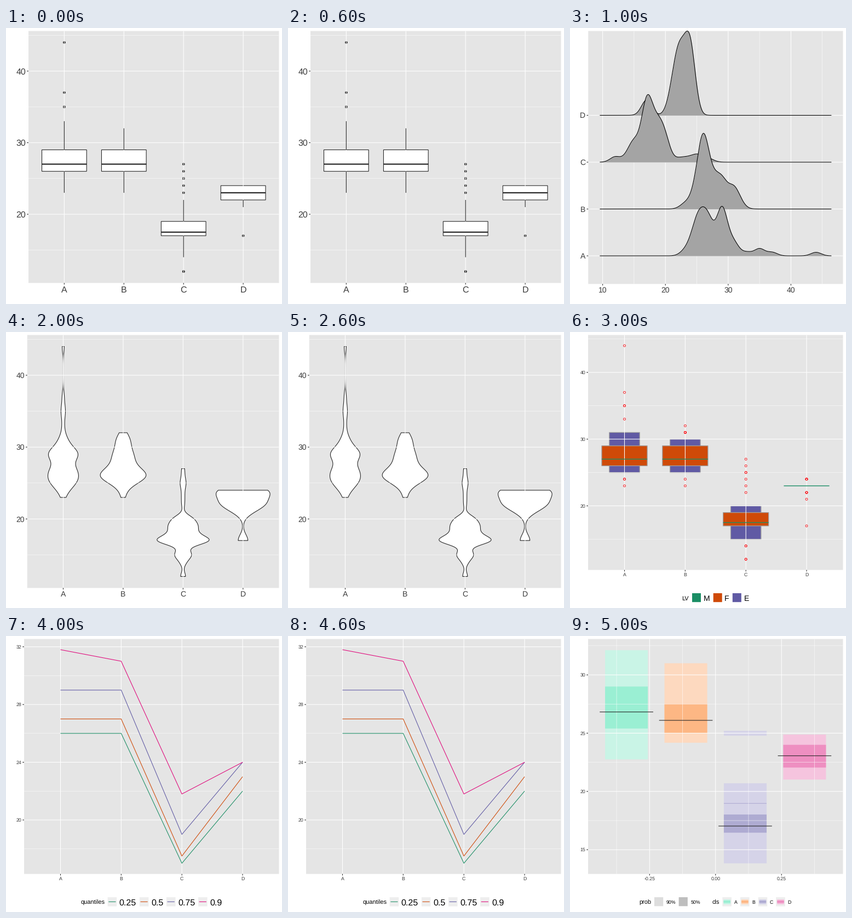
Recreate the animation shown at these times as a matplotlib script. Size 504 by 504 pixels, loop 6000 ms.

```python
import numpy as np
import matplotlib.pyplot as plt
from matplotlib.animation import FuncAnimation
from matplotlib.patches import Circle, Polygon, Rectangle

plt.rcParams.update({
    "font.family": "Liberation Sans",
    "path.snap": False,
    "text.hinting": "none",
    "lines.solid_capstyle": "butt",
})

SIZE = 504
TOP, RIGHT = 5.48, 498.52
THIN = 1.07
INK, LABEL, PANEL, KEY = "#222222", "#3b3b3b", "#e5e5e5", "#eeeeee"
GREEN, ORANGE, PURPLE, PINK = "#1b8e65", "#cf4a08", "#605aa4", "#e0087b"

NAMES = "ABCD"
COUNTS = [
    {23: 1, 24: 2, 25: 7, 26: 7, 27: 7, 28: 1, 29: 12, 30: 2, 31: 3,
     33: 1, 35: 2, 37: 1, 44: 1},
    {23: 1, 24: 1, 25: 4, 26: 14, 27: 5, 28: 4, 29: 5, 30: 2, 31: 4, 32: 1},
    {12: 2, 14: 2, 15: 6, 16: 2, 17: 19, 18: 8, 19: 9, 20: 7, 22: 1,
     23: 1, 24: 1, 25: 2, 26: 1, 27: 1},
    {17: 1, 21: 1, 22: 3, 23: 2, 24: 4},
]
DATA = [np.repeat(list(c.keys()), list(c.values())).astype(float)
        for c in COUNTS]

fig = plt.figure(figsize=(7, 7), dpi=72, facecolor="white")
ax = fig.add_axes([0, 0, 1, 1])


def bandwidth(v):
    q1, q3 = np.percentile(v, [25, 75])
    return 0.9 * min(v.std(ddof=1), (q3 - q1) / 1.34) * len(v) ** -0.2


def density(v, at, bw):
    z = (at[:, None] - v[None, :]) / bw
    return np.exp(-z * z / 2).sum(axis=1) / (len(v) * bw * np.sqrt(2 * np.pi))


def rect(x0, y0, x1, y1, fill, edge="none", lw=0):
    r = Rectangle((x0, y0), x1 - x0, y1 - y0, fc=fill, ec=edge, lw=lw,
                  joinstyle="miter")
    return ax.add_patch(r)


def line(xs, ys, color=INK, lw=THIN):
    ax.plot(xs, ys, color=color, lw=lw)


def text(x, y, s, size, color="black", ha="left"):
    """Place text with its capitals centred on y."""
    ax.text(x, y + 0.358 * size, s, size=size, color=color, ha=ha,
            va="baseline")


class Plot:
    """Grey panel that maps data units to stage pixels."""

    def __init__(self, left, bottom, xr, yr):
        self.left, self.bottom, self.xr, self.yr = left, bottom, xr, yr
        self.ux = (RIGHT - left) / (xr[1] - xr[0])
        self.uy = (bottom - TOP) / (yr[1] - yr[0])
        self.back = rect(left, TOP, RIGHT, bottom, PANEL)

    def x(self, v):
        return self.left + (np.asarray(v) - self.xr[0]) * self.ux

    def y(self, v):
        return self.bottom - (np.asarray(v) - self.yr[0]) * self.uy

    def vline(self, v, lw):
        line([self.x(v)] * 2, [TOP, self.bottom], "white", lw)

    def hline(self, v, lw):
        line([self.left, RIGHT], [self.y(v)] * 2, "white", lw)

    def grid(self, xticks, yticks, xminor, yminor, size, label_y):
        """Ticks are (value, label) pairs."""
        for v in yminor:
            self.hline(v, THIN / 2)
        for v in xminor:
            self.vline(v, THIN / 2)
        for v, s in yticks:
            self.hline(v, THIN)
            line([self.left - 2.74, self.left], [self.y(v)] * 2)
            text(self.left - 4.94, self.y(v), s, size, LABEL, "right")
        for v, s in xticks:
            self.vline(v, THIN)
            line([self.x(v)] * 2, [self.bottom, self.bottom + 2.74])
            text(self.x(v), label_y, s, size, LABEL, "center")


CLASSES = [(i + 1, s) for i, s in enumerate(NAMES)]


def ticks(values):
    return [(v, str(v)) for v in values]


def value_plot(left, bottom, size, label_y):
    p = Plot(left, bottom, (0.4, 4.6), (10.4, 45.6))
    p.grid(CLASSES, ticks([20, 30, 40]), [], [15, 25, 35, 45], size, label_y)
    return p


def boxes():
    p = value_plot(41, 465.6, 16, 477.3)
    for i, v in enumerate(DATA, 1):
        q1, med, q3 = np.percentile(v, [25, 50, 75])
        reach = 1.5 * (q3 - q1)
        inside = v[(v >= q1 - reach) & (v <= q3 + reach)]
        x0, xc, x1 = p.x([i - 0.375, i, i + 0.375])
        for o in v[(v < inside.min()) | (v > inside.max())]:
            ax.add_patch(Circle((xc, p.y(o)), 1.95, fc=INK, ec=INK, lw=0.71))
        line([xc, xc], p.y([q3, inside.max()]))
        line([xc, xc], p.y([q1, inside.min()]))
        rect(x0, p.y(q3), x1, p.y(q1), "white", INK, THIN)
        line([x0, x1], [p.y(med)] * 2, lw=2 * THIN)


def ridges():
    bw = np.mean([bandwidth(v) for v in DATA])
    lo, hi = 12 - 3 * bw, 44 + 3 * bw
    pad = 0.05 * (hi - lo)
    p = Plot(33.3, 467.4, (lo - pad, hi + pad), (0.4, 5.8))
    p.grid(ticks([10, 20, 30, 40]), CLASSES, [15, 25, 35, 45], [], 14, 478)
    at = np.linspace(lo, hi, 512)
    curves = [density(v, at, bw) for v in DATA]
    peak = max(c.max() for c in curves)
    for i in (3, 2, 1, 0):
        ys = p.y(i + 1 + 1.8 * curves[i] / peak)
        base = p.y(i + 1)
        fill = ax.fill_between(p.x(at), ys, base, color="#a4a4a4", lw=0)
        fill.set_zorder(2 + 0.1 * (4 - i))
        edge, = ax.plot(p.x(at), ys, color="black", lw=THIN,
                        zorder=2.05 + 0.1 * (4 - i))
        for art in (fill, edge):
            art.set_clip_path(p.back)


def violins():
    p = value_plot(38.8, 467.4, 14, 478)
    shapes = []
    for v in DATA:
        at = np.linspace(v.min(), v.max(), 512)
        shapes.append((at, density(v, at, bandwidth(v))))
    peak = max(d.max() for _, d in shapes)
    for i, (at, d) in enumerate(shapes, 1):
        half = 0.45 * d / peak
        xs = p.x(np.concatenate([i - half, (i + half)[::-1]]))
        ys = p.y(np.concatenate([at, at[::-1]]))
        ax.add_patch(Polygon(np.column_stack([xs, ys]), fc="white", ec=INK,
                             lw=THIN, joinstyle="round"))


def letter_values():
    p = value_plot(33, 434.5, 8.8, 442.8)
    for i, v in enumerate(DATA, 1):
        e0, q1, med, q3, e1 = np.percentile(v, [12.5, 25, 50, 75, 87.5])
        levels = [(e0, e1, 0.25, PURPLE), (q1, q3, 0.375, ORANGE)]
        if i == 4:
            levels, e0, e1 = [], med, med
        for a, b, half, color in levels:
            rect(p.x(i - half), p.y(b), p.x(i + half), p.y(a), color,
                 "#a0a0a0", 1.3)
        line(p.x([i - 0.375, i + 0.375]), [p.y(med)] * 2, GREEN, 1.4)
        for o in v[(v < e0) | (v > e1)]:
            ax.add_patch(Circle((p.x(i), p.y(o)), 1.95, fc="none",
                                ec="#fb0007", lw=0.8, zorder=3))
    text(204, 486, "LV", 11)
    for x, s, color in zip((223, 261.7, 296.8), "MFE",
                           (GREEN, ORANGE, PURPLE)):
        rect(x, 477, x + 16, 493.2, color)
        text(x + 20.6, 486, s, 14)


def quantiles():
    p = Plot(33, 434.5, (0.4, 4.6), (16.26, 32.54))
    p.grid(CLASSES, ticks([20, 24, 28, 32]), [], [18, 22, 26, 30], 8.8, 442.8)
    text(137, 486, "quantiles", 11)
    rows = zip((0.25, 0.5, 0.75, 0.9), (GREEN, ORANGE, PURPLE, PINK),
               (185.6, 243.8, 292.9, 351))
    for q, color, x in rows:
        line(p.x([1, 2, 3, 4]), p.y([np.quantile(v, q) for v in DATA]), color)
        rect(x, 477, x + 16.6, 493.6, KEY)
        line([x + 1.7, x + 14.9], [485.3] * 2, color)
        text(x + 21.1, 486, str(q), 16)


# light colour, dark colour, light spans, dark spans, mode
REGIONS = [
    ("#c9f4e6", "#9aefd3", [(22.75, 32.12)], [(25.4, 29.0)], 26.82),
    ("#fdd9bf", "#fdb784", [(24.18, 31.0)], [(25.0, 27.5)], 26.1),
    ("#d5d3e8", "#aeabd2", [(13.83, 20.7), (24.78, 25.2)],
     [(16.46, 18.02), (18.95, 19.0)], 17.03),
    ("#f5c4de", "#ee8fc1", [(21.02, 24.88)], [(22.05, 24.0)], 23.06),
]


def density_regions():
    p = Plot(33, 434.5, (-0.483, 0.483), (12.92, 33.08))
    xt = [(v, f"{v:.2f}") for v in (-0.25, 0, 0.25)]
    p.grid(xt, ticks([15, 20, 25, 30]), [-0.375, -0.125, 0.125, 0.375],
           [17.5, 22.5, 27.5, 32.5], 8.8, 443)
    text(126.5, 486, "prob", 11)
    for x, s, color in ((154, "90%", "#dddddd"), (198.6, "50%", "#bebebe")):
        rect(x, 477, x + 16.2, 493.3, color)
        text(x + 21.6, 486, s, 8.8)
    text(259.5, 486, "cls", 11)
    for i, (light, dark, outer, inner, mode) in enumerate(REGIONS):
        xc = -0.3375 + 0.225 * i
        for spans, color in ((outer, light), (inner, dark)):
            for a, b in spans:
                rect(p.x(xc - 0.081), p.y(b), p.x(xc + 0.081), p.y(a), color)
        line(p.x([xc - 0.1013, xc + 0.1013]), [p.y(mode)] * 2)
        x = 278.4 + 32.6 * i
        rect(x, 477, x + 16.6, 493.6, KEY)
        rect(x + 2, 481, x + 14.6, 490, light)
        rect(x + 2, 483.2, x + 14.6, 487.4, dark)
        text(x + 21.4, 486, NAMES[i], 8.8)


SCENES = [boxes, ridges, violins, letter_values, quantiles, density_regions]


def draw(i):
    ax.clear()
    ax.set_xlim(0, SIZE)
    ax.set_ylim(SIZE, 0)
    ax.axis("off")
    # later shapes cover earlier ones
    SCENES[i % len(SCENES)]()
    shapes = [a for a in ax.get_children()
              if a in ax.patches or a in ax.lines]
    if SCENES[i % len(SCENES)] is not ridges:
        for n, a in enumerate(shapes):
            a.set_zorder(a.get_zorder() if a.get_zorder() >= 3
                         else (1.5 if a in ax.lines and a.get_color() == "white"
                               else a.get_zorder()) )
    return []


def setup():
    return draw(0)


anim = FuncAnimation(fig, draw, frames=len(SCENES), init_func=setup,
                     interval=1000, repeat=True, repeat_delay=0, blit=False,
                     cache_frame_data=False)
plt.show()
```
